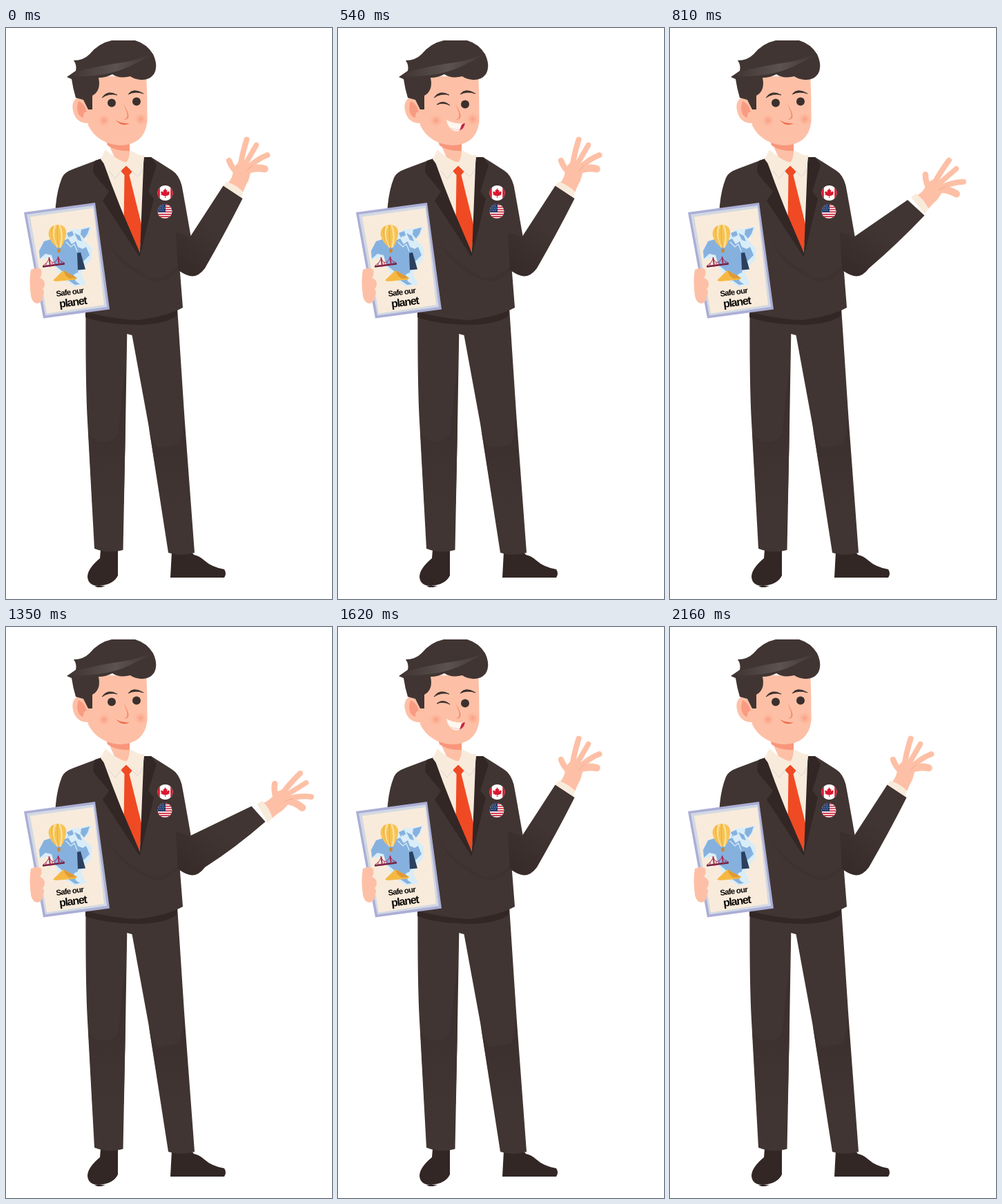
Recreate the animation shown at these times as an HTML page. Size 472 px wide and 827 px high, loop 2430 ms.

```html
<!DOCTYPE html>
<html lang="en">
<head>
<meta charset="utf-8">
<title>Waving man</title>
<style>
  html, body { margin: 0; width: 100%; height: 100%; overflow: hidden; background: #fff; }
  svg { display: block; width: 100%; height: 100%; }
  .suit { fill: #403532; }
  .dark { fill: #322725; }
  .skin { fill: #fdc0a6; }
  .cream { fill: #f9ebdb; }
  .line { fill: none; stroke-linecap: round; stroke-linejoin: round; }
  text { font-family: "Liberation Sans", Arial, sans-serif; font-weight: bold; fill: #0b0908; }
</style>
</head>
<body>
<svg viewBox="0 0 472 827">
  <defs>
    <linearGradient id="knee" x1="0" y1="0" x2="0" y2="1">
      <stop offset="0" stop-color="#392e2b"/><stop offset="1" stop-color="#403532"/>
    </linearGradient>
    <linearGradient id="elbow" gradientUnits="userSpaceOnUse" x1="254" y1="350" x2="304" y2="292">
      <stop offset="0" stop-color="#362b29"/><stop offset="1" stop-color="#403532"/>
    </linearGradient>
    <linearGradient id="shine" gradientUnits="userSpaceOnUse" x1="92" y1="0" x2="214" y2="0">
      <stop offset="0" stop-color="#403532"/><stop offset=".55" stop-color="#5c5251"/><stop offset="1" stop-color="#403532"/>
    </linearGradient>
    <radialGradient id="blush">
      <stop offset="0" stop-color="#f99c82"/><stop offset="1" stop-color="#fdc0a6" stop-opacity="0"/>
    </radialGradient>
    <clipPath id="pinTop"><circle cx="230.500" cy="239" r="11"/></clipPath>
    <clipPath id="pinLow"><circle cx="230" cy="265.500" r="10.500"/></clipPath>
    <clipPath id="grin"><path d="M157 133 Q169 140 184 138 Q182 149 172 149.500 Q160 149 157 133Z"/></clipPath>
    <clipPath id="face"><path id="faceShape" d="M117 70 H203 Q204.500 84 204.500 136 Q200 170 164 170 Q132 167 119 141Z"/></clipPath>
    <clipPath id="balloon"><path id="balloonShape" d="M75 285 C84 285 88 291 87 299 Q86 307 80 318 H74 Q64 310 62 301 C60 292 66 285 75 285Z"/></clipPath>
  </defs>

  <!-- shoes and trousers -->
  <path class="dark" d="M137 756 L136 768 Q118 783 118 795 Q119 808 135 808 Q156 806 162 793 V756Z"/>
  <path class="dark" d="M128 808 H144 L138 810 H132Z"/>
  <path class="dark" d="M240 758 L238 796 H316 Q320 790 316 784 Q298 781 287 771 Q279 764 272 763 L268 758Z"/>
  <path class="suit" d="M115.500 405 Q115 520 118 570 L128 754 Q148 762 169.500 756 L172.800 590 L175.300 443 L182.500 445 L206 573 L235 760 Q254 766 273 760 L258.500 565 L248 405Z"/>
  <path fill="url(#knee)" d="M119.500 589 Q141 610 162 589 Q168 535 173 490 L172.500 600 L170.500 690 H125Z"/>
  <path fill="url(#knee)" d="M207 579 Q212 605 222 608 L251 603 Q258 580 257 553 L266 690 H225Z"/>

  <!-- jacket -->
  <path class="dark" d="M115 409 H248 L247 417 Q232 428 197 430 Q146 430 115 419Z"/>
  <path class="suit" d="M138 189 L98 204 Q84 209 81 217 Q73 237 71.500 264 L110 405 L115 411 Q150 421 190 423 Q232 418 256 405 L250.500 335 L268 304 Q259 252 254.500 228 Q250 212 240 206 Q226 197 210 187Z"/>
  <path fill="#3c312e" d="M145 305 Q158 334 212 363 Q236 360 250 344 L250 349 Q232 372 212 366 Q162 346 145 305Z" opacity=".7"/>

  <!-- shirt, tie, lapels -->
  <path class="cream" d="M140 186 L200 184 L197 300 L193 327 L144 220Z"/>
  <path fill="#f04a24" d="M166 207 L174 199.500 L183 207.500 L178.500 213 L197 288 L193.500 326 L170.500 282 L171.500 213Z"/>
  <path class="dark" d="M139 189 L129 192 Q125 202 127 211 L149 237 L140 250 L193.500 332 L194 326 L167.500 264 Q152 226 139 189Z"/>
  <path class="dark" d="M199.500 187 H210 Q215 193 218 199 L206 237 L214 247 L193.500 332 L194 325Z"/>

  <!-- neck and collar -->
  <path class="skin" d="M145 160 H179 V194 H160Z"/>
  <path fill="#f9967b" d="M145 163 Q160 170 179 168 V178 Q160 179 147 170Z"/>
  <path class="cream" d="M144 176 L137 190 L158 218.500 L167 206 L174 199 L190 216 Q196 212 198 203 L200 187 L179 177 Q179 189 174 195 Q158 190 144 176Z"/>
  <path class="line" stroke="#d6d6dc" d="M149 207 L158 218 L167 207 M182 207 L190 215 Q196 211 198 203"/>

  <!-- head -->
  <path class="skin" d="M121 106 Q112 97 103 101 Q93 108 98 123 Q103 139 121 138Z"/>
  <path fill="#f99b82" d="M105 106 Q114 109 117 122 Q112 120 112 130 Q103 128 103 114Z"/>
  <use href="#faceShape" class="skin"/>
  <g clip-path="url(#face)" fill="url(#blush)">
    <circle cx="142" cy="134" r="11.500"/><circle cx="195" cy="132" r="11.500"/>
  </g>
  <path class="suit" d="M88 71 L101 62 Q103 54 98 47 Q112 47 121 38 Q134 22 153 18 H187 Q204 23 213 38 Q221 55 214 67 Q207 76 195 75 Q185 74 180 70 Q164 74 154 67 Q145 72 134 72 Q138 91 125 98 L125 118 H119 L112 104 L101 101 Q97 88 95 74Z"/>
  <path fill="url(#shine)" d="M92 70 Q150 72 186 52 Q207 42 213 37 Q192 46 174 49 Q138 54 102 63Z"/>
  <path fill="#f58f74" d="M170 109 L175 119 Q182 133 170 133 Q177 131 175 123Z"/>
  <g fill="#3b302d" stroke="#3b302d" stroke-width=".8">
    <path d="M139 101 Q147 89 161 97 Q149 94 139 101Z"/>
    <path d="M177 96 Q184 86 199 95 Q187 91 177 96Z"/>
  </g>
  <g id="smile">
    <g fill="#3b302d"><circle cx="153" cy="108.500" r="6"/><circle cx="189" cy="106.500" r="6"/></g>
    <path fill="#f26a4b" d="M159 133.500 Q168 139 179 138 Q168 144 159 133.500Z"/>
  </g>
  <g id="wink">
    <circle cx="184" cy="110.500" r="6" fill="#3b302d"/>
    <path fill="#3b302d" stroke="#3b302d" stroke-width=".8" d="M143 111 Q152 103 162 112 Q152 107 143 111Z"/>
    <g clip-path="url(#grin)">
      <path fill="#fff6ef" d="M155 130 H186 V152 H155Z"/>
      <path fill="#c7293f" d="M186 135 L179 140 L175 151 H186Z"/>
      <path class="line" stroke="#efc9c0" d="M157 142 Q168 149 177 147"/>
    </g>
  </g>

  <!-- pins -->
  <g clip-path="url(#pinTop)">
    <path fill="#fff" d="M219 228 H242 V250 H219Z"/>
    <path fill="#d9182f" d="M219 228 H222.800 V250 H219Z M238.200 228 H242 V250 H238.200Z"/>
    <path fill="#d9182f" d="M230.500 232 L232 235 L233.500 234.500 L233 238 L235 236.500 L237 237.500 L236 240 L237 241 L233 243 L231 243 V246 H230 V243 H228 L224 241 L225 240 L224 237.500 L226 236.500 L228 238 L227.500 234.500 L229 235Z"/>
  </g>
  <g clip-path="url(#pinLow)">
    <path fill="#fff" d="M219 254 H241 V277 H219Z"/>
    <path class="line" stroke="#c9243a" stroke-width="1.700" d="M218 256.200 H242 M218 259.600 H242 M218 263 H242 M218 266.400 H242 M218 269.800 H242 M218 273.200 H242 M218 276.300 H242"/>
    <path fill="#263d6c" d="M219 254 H231 V267 H219Z"/>
    <path class="line" stroke="#cbd5e6" stroke-width="1" stroke-dasharray=".1 2.600" d="M222 258 H230 M221 261 H230 M222 264 H230"/>
  </g>

  <!-- poster -->
  <path fill="#abaed6" d="M26 267 L129 253 L150 407.500 L54 420.500Z"/>
  <path fill="#d2d9e3" d="M30 270 L127 257 L146 404 L57 416.500Z"/>
  <path class="cream" d="M35 273.500 L126.500 261 L142 401 L59 413.500Z"/>
  <path fill="#d8edf8" d="M47 322 L56 308 L83 304 L94 292 L111 290 L124 287 L119 301 L112 306 L125 319 L123 336 L113 346 L109 356 L116 371 L99 375 L80 362 L69 343 L66 332 L49 335Z"/>
  <path fill="#86b1df" d="M48 323 L55 309 L68 305 L83 308 L90 305 L95 313 L101 309 L104 317 L111 320 L116 317 L121 329 L114 336 L106 342 L104 354 L98 357 L101 367 L107 371 L100 372 L87 363 L81 352 L70 343 L66 329 L57 327 L49 334Z"/>
  <path fill="#86b1df" d="M109 292 L121 289 L118 298 L113 305 L108 299Z M88 297 L96 294 L98 300 L91 304Z M99 297 L107 301 L110 309 L104 307Z"/>
  <path class="line" stroke="#d8edf8" stroke-width="1.200" d="M87 310 L94 317 L99 313 L103 323 M92 302 L99 306 M108 311 L115 315"/>
  <use href="#balloonShape" fill="#f7c352"/>
  <g clip-path="url(#balloon)" fill="none" stroke="#fbe09a" stroke-width="2.500">
    <path d="M72 284 Q64 302 75 319 M77 284 Q84 301 78 319"/>
    <path stroke="#e9a13c" stroke-width=".8" d="M75 284 Q73 300 76 319 M67 287 Q64 301 73 317"/>
  </g>
  <path fill="#c98a32" d="M74 320 L79 319.500 L78.500 325 L75 325.500Z"/>
  <g class="line" stroke="#a62d56">
    <path stroke="#70203f" stroke-width="2.500" d="M54 345.500 L84 341.500"/>
    <path stroke-width="2" d="M62.500 333 L64 345 M75.500 332 L77 343"/>
    <path stroke-width="1" d="M54 344 Q60 341 62.500 334 Q68 346 75.500 333 Q79 339 84 340 M58 341 V344 M67 340 V344 M71 340 V343 M80 339 V342"/>
  </g>
  <path fill="#2b405e" d="M103 326 L108 325 L115 349.500 L104 350.500Z"/>
  <path fill="#f5b943" d="M68 365.500 L83 351 L103 362 L101 364.500 L72 367Z"/>
  <path fill="#e09a35" d="M83 351 L86 358 L92 363 L103 362Z"/>
  <g transform="rotate(-7.500 73 389)">
    <text x="73" y="389" font-size="11.500" letter-spacing="-.8">Safe our</text>
    <text x="75.500" y="405.500" font-size="16" letter-spacing="-1.200">planet</text>
  </g>
  <path class="skin" d="M36 350 Q46 345 51 350 Q53 357 49 362 Q56 364 56 371 Q56 376 53 378 Q57 383 53 388 Q54 398 45 399 Q38 398 36 388 Q33 366 36 350Z"/>

  <!-- waving arm -->
  <g id="hand">
    <path class="skin" d="M329 203 L336 195 Q351 196 355 207 L351 221 Q347 228 343 238 L320 226 Q330 216 329 203Z"/>
    <g class="line" stroke="#fdc0a6">
      <path stroke-width="8.500" d="M323 192 Q326 201 334 209"/>
      <path stroke-width="8" d="M339 202 Q342 182 348.500 161.500"/>
      <path stroke-width="7.500" d="M343 203 L362.500 169.500"/>
      <path stroke-width="8" d="M347 206 Q362 190 378.500 184"/>
      <path stroke-width="10.500" d="M349 206 Q361 201 374.500 204"/>
    </g>
    <path class="line" stroke="#f7a78d" d="M349 207 Q353 201 357 199"/>
    <path class="cream" d="M319 222.500 Q333 227 343 237 L341 247 L314 230Z"/>
  </g>
  <path id="sleeve" fill="url(#elbow)"/>
</svg>

<script>
  const STEP = 270, LOOP = 2430;
  // turn: hand rotation; cuff: upper and lower sleeve corners; bend: lower edge control point
  const up = { turn: 0, cuff: "314.500 228.500 L342.500 247", bend: "320 292" };
  const poses = [
    up,
    { turn: 28, cuff: "355.500 259.500 L375.500 282", bend: "332 320" },
    { ...up, wink: true },
    { turn: 19, cuff: "344 249 L368.500 271.500", bend: "328 314" }
  ];
  const get = id => document.getElementById(id);
  const hand = get("hand"), sleeve = get("sleeve"), smile = get("smile"), wink = get("wink");
  let shown = -1;

  function show(n) {
    const { turn, cuff, bend, wink: winking } = poses[n];
    hand.setAttribute("transform", `rotate(${turn} 286 342)`);
    sleeve.setAttribute("d", `M266.500 302.500 L${cuff} Q${bend} 288 348 Q279 360 269 359.500 Q258 358 249 350 L246 296Z`);
    smile.style.display = winking ? "none" : "";
    wink.style.display = winking ? "" : "none";
    shown = n;
  }

  const start = performance.now();
  function tick() {
    const t = (performance.now() - start) % LOOP;
    const n = Math.floor(t / STEP) % poses.length;
    if (n !== shown) show(n);
    requestAnimationFrame(tick);
  }
  tick();
</script>
</body>
</html>
```
